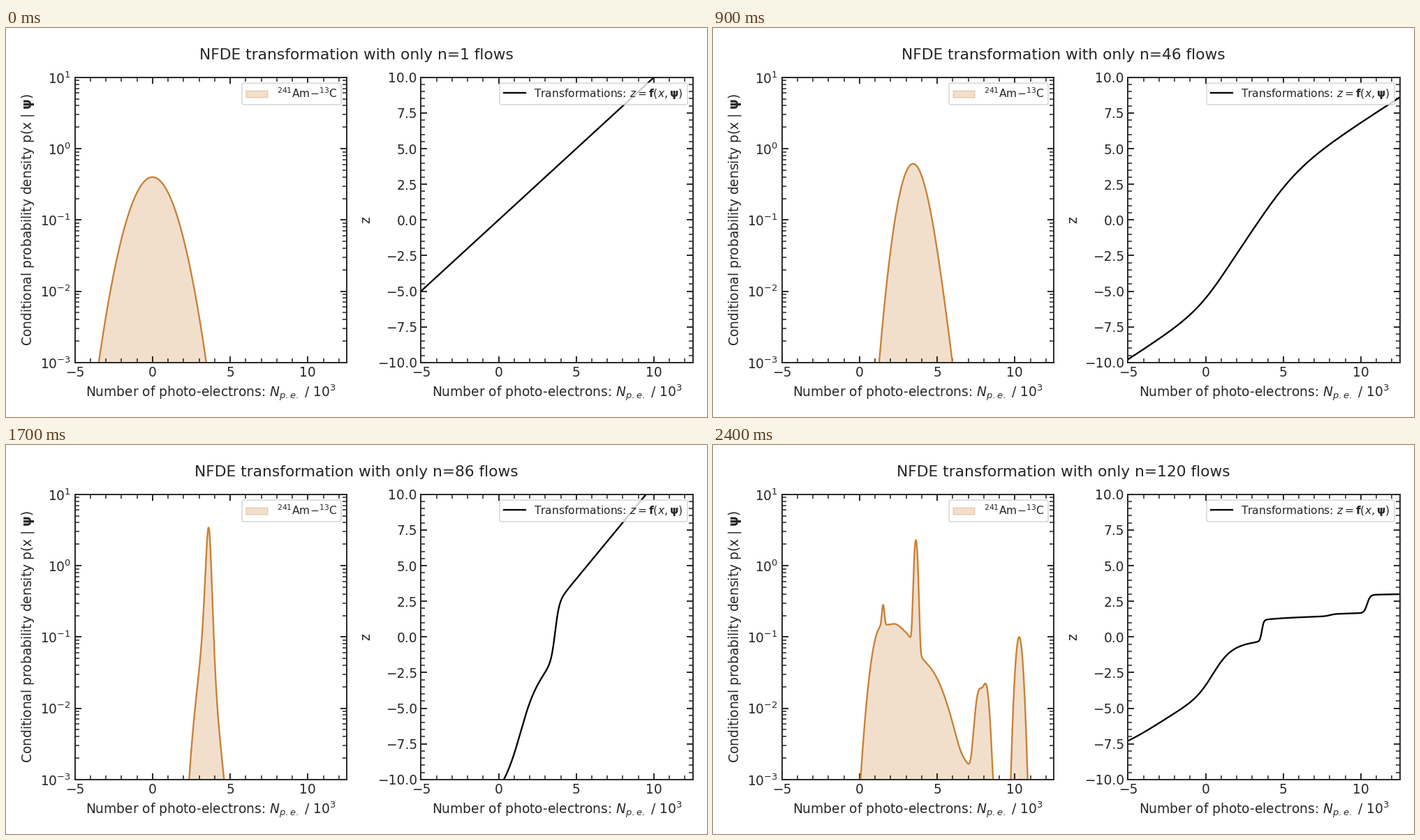
These frames come from a looping animation (1004x558 px, 2500 ms). A matplotlib script:

```python
import numpy as np
import matplotlib.pyplot as plt
from matplotlib.animation import FuncAnimation
from matplotlib.ticker import AutoMinorLocator, MultipleLocator

W, H = 1004, 558
FRAMES, STEP = 25, 100
PT = W / (9 * 72)  # pixels per point on a 9 inch wide layout
DARK, OCHRE = "0.15", "#c98137"

rc = {
    "font.family": "DejaVu Sans", "font.size": 12 * PT,
    "text.color": DARK, "axes.labelcolor": DARK, "axes.edgecolor": DARK,
    "axes.linewidth": 1.25 * PT, "axes.labelpad": 4 * PT,
    "axes.labelsize": 12 * PT, "legend.fontsize": 10 * PT,
    "lines.linewidth": 1.5 * PT, "patch.linewidth": PT,
}
for side, far in (("xtick", "top"), ("ytick", "right")):
    rc.update({
        f"{side}.{far}": True, f"{side}.direction": "in",
        f"{side}.color": DARK, f"{side}.labelsize": 12 * PT,
        f"{side}.minor.visible": True,
        f"{side}.major.size": 6 * PT, f"{side}.minor.size": 4 * PT,
        f"{side}.major.width": 1.25 * PT, f"{side}.minor.width": PT,
        f"{side}.major.pad": 3.5 * PT, f"{side}.minor.pad": 3.5 * PT,
    })
plt.rcParams.update(rc)

X = np.linspace(-5, 12.5, 1800)


def flow(root, slope, *steps):
    """Straight line plus tanh steps (height, centre, width), zero at root."""
    def f(x):
        return slope * x + sum(h * np.tanh((x - c) / w) for h, c, w in steps)
    return f(X) - f(root)


def pushed(z):
    """Density of x when z(x) is standard normal."""
    return np.exp(-z**2 / 2) / np.sqrt(2 * np.pi) * np.gradient(z, X)


def bumps(*parts):
    """Sum of Gaussian bumps (height, centre, width)."""
    return sum(a * np.exp(-((X - c) / s)**2 / 2) for a, c, s in parts)


z_1 = flow(0, 1)
z_16 = flow(2.02, .886, (1.16, 2.8, 2.9))
z_31 = flow(3.675, .82, (1.85, 2.7, 2.64))
z_56 = flow(3.36, .625, (1.6, .9, 1.8), (2.25, 4, 2.5))
z_86 = flow(3.6, 1.32, (2.25, 1.4, .9), (1.9, 3.64, .26))
z_106 = flow(3.82, .15, (2.2, -2, 4.5), (1.4, .6, 1.2), (1.2, 3.58, .2),
             (.55, 8.6, .55), (1.65, 10.75, 1.15))
z_120 = flow(3.54, .02, (2.6, -3, 4), (1.6, .5, 1.15), (.75, 3.62, .125),
             (.08, 8, .35), (.64, 10.4, .2))

p_106 = bumps((.001, 1.54, .07), (.007, 3.2, .68), (1.7, 3.62, .1),
              (.55, 3.78, .13), (.08, 4.1, .2), (.07, 4.5, .55),
              (.06, 5.8, .7), (.13, 7.4, .4), (.11, 8.32, .28),
              (.015, 8.95, .25), (.006, 9.75, .28))
p_120 = bumps((.11, 1.3, .4), (.135, 1.52, .07), (.125, 2.2, .5),
              (.05, 3.1, .45), (2.22, 3.63, .098), (.045, 3.9, 1.05),
              (.001, 7, .4), (.0175, 7.72, .22), (.019, 8.15, .175),
              (.001, 9, .25), (.1, 10.28, .18))

times = [0, 3, 6, 11, 17, 21, 24]
flows = [z_1, z_16, z_31, z_56, z_86, z_106, z_120]
dens = [pushed(z) for z in flows[:5]] + [p_106, p_120]
logs = [np.log(p + 1e-7) for p in dens]


def state(i):
    k = min(np.searchsorted(times, i, side="right") - 1, len(times) - 2)
    t = (i - times[k]) / (times[k + 1] - times[k])

    def mix(a):
        return a[k] + t * (a[k + 1] - a[k])
    return np.exp(mix(logs)), mix(flows)


def area(p):
    return [np.column_stack([np.r_[X, X[::-1]],
                             np.r_[p, np.full_like(p, 1e-9)]])]


def panel(left, right, top=70.8, bottom=479.8):
    ax = fig.add_axes([left / W, 1 - bottom / H,
                       (right - left) / W, (bottom - top) / H])
    ax.set_xlim(-5, 12.5)
    ax.xaxis.set_major_locator(MultipleLocator(5))
    ax.xaxis.set_minor_locator(AutoMinorLocator(5))
    ax.set_xlabel(r"Number of photo-electrons: $N_{p.e.}$ / $10^3$")
    return ax


fig = plt.figure(figsize=(W / 72, H / 72), dpi=72, facecolor="white")
title = fig.text(0.5, 1 - 45 / H, "", ha="center", va="baseline",
                 fontsize=14 * PT)

p, z = state(0)
ax1 = panel(98.6, 487.9)
ax1.set_yscale("log")
ax1.set_ylabel(r"Conditional probability density p(x | $\mathbf{\psi}$)")
edge, = ax1.plot(X, p, color=OCHRE)
fill = ax1.fill_between(X, p, 1e-9, color=OCHRE, alpha=0.25,
                        label=r"$^{241}$Am$-^{13}$C")
ax1.set_ylim(1e-3, 10)
ax1.legend(loc="upper right")

ax2 = panel(594.3, 983.6)
ax2.set_ylim(-10, 10)
ax2.yaxis.set_major_locator(MultipleLocator(2.5))
ax2.yaxis.set_minor_locator(AutoMinorLocator(5))
ax2.set_ylabel("z")
line, = ax2.plot(X, z, color="black",
                 label=r"Transformations: $z=\mathbf{f}(x,\mathbf{\psi})$")
ax2.legend(loc="upper right")


def update(i):
    p, z = state(i)
    edge.set_ydata(p)
    fill.set_verts(area(p))
    line.set_ydata(z)
    title.set_text(f"NFDE transformation with only n={min(1 + 5 * i, 120)} flows")
    return edge, fill, line, title


anim = FuncAnimation(fig, update, frames=FRAMES, interval=STEP,
                     init_func=lambda: update(0), repeat=True, repeat_delay=0)
plt.show()
```
